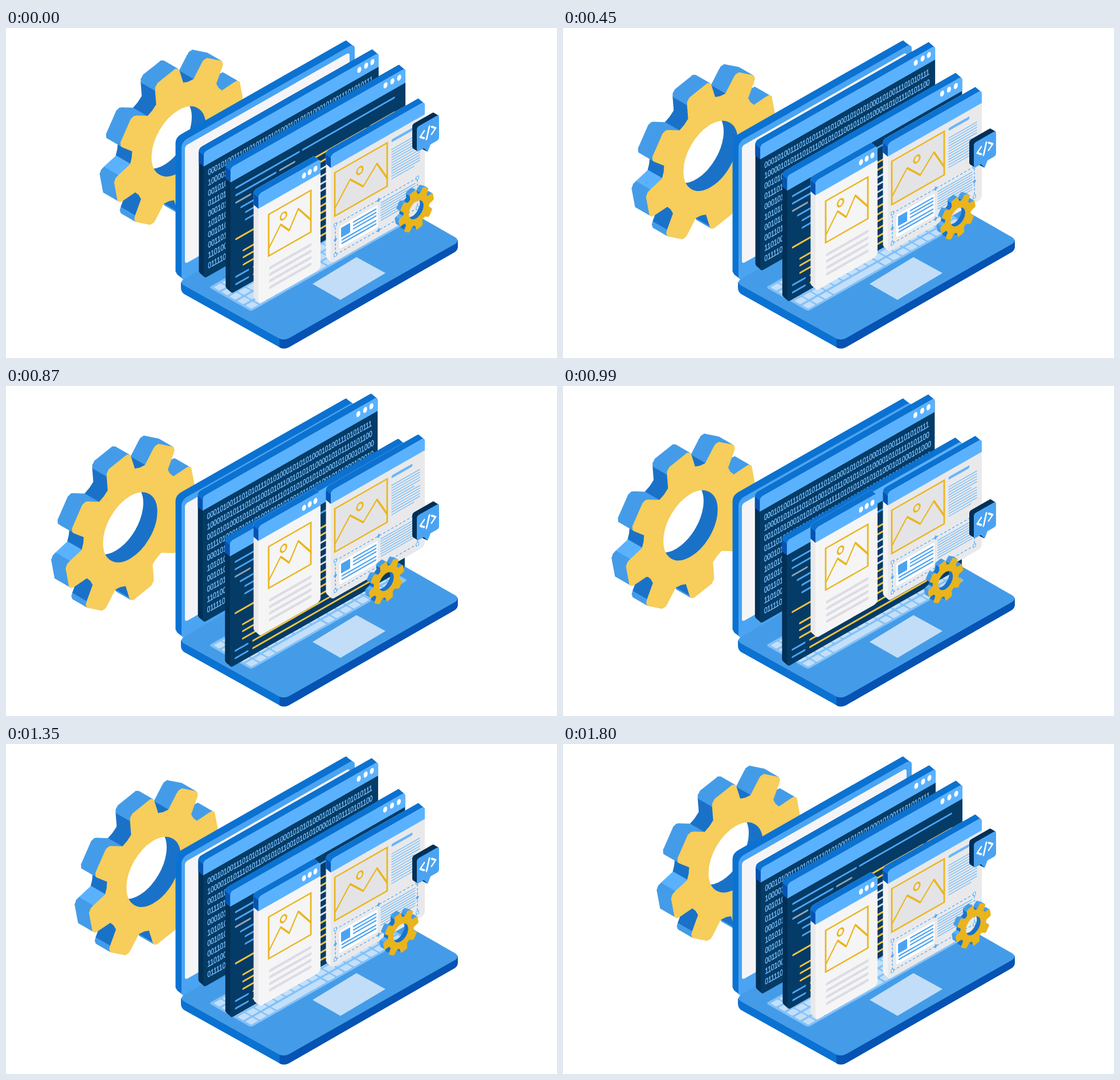
Animation of 967x579 px, one loop 1830 ms. Source, as an HTML page:

```html
<!DOCTYPE html>
<html lang="en">
<head>
<meta charset="utf-8">
<title>Web development</title>
<style>
html, body { margin: 0; width: 100%; height: 100%; overflow: hidden; background: #fff; }
svg { display: block; width: 100vw; height: 100vh; }
text { font: 14.5px "Liberation Sans", Arial, sans-serif; fill: #7cc0fb; stroke: #7cc0fb; stroke-width: .5; }
</style>
</head>
<body>
<svg id="stage" viewBox="0 0 967 579"></svg>
<script>
const SLOPE = 0.57;
const C = {
  sky: '#5ab2ff', mid: '#449ce8', edge: '#0b72d2', deep: '#0653b3', wall: '#1a72c8',
  navy: '#043b67', navySide: '#022f55', gold: '#eab61f', goldLine: '#f3c440',
  grey: '#8ea3b8'
};

// SVG string helpers
const path = (d, fill, more = '') => `<path d="${d}" fill="${fill}" ${more}/>`;
const rect = (x, y, w, h, fill, r = 0, more = '') =>
  `<rect x="${x}" y="${y}" width="${w}" height="${h}" rx="${r}" fill="${fill}" ${more}/>`;
const stroke = (d, color, width, more = '') =>
  path(d, 'none', `stroke="${color}" stroke-width="${width}" stroke-linecap="round" stroke-linejoin="round" ${more}`);
const bar = (x1, x2, y, color, width) => stroke(`M${x1},${y}H${x2}`, color, width);
const repeat = (n, f) => Array.from({ length: n }, (_, i) => f(i)).join('');
const upright = (x, y, inner) => `<g transform="matrix(1,${-SLOPE},0,1,${x},${y})">${inner}</g>`;

// Outline of a rounded panel swept back by (dx, dy)
function hull(w, h, r, dx, dy, square) {
  const k = r * 0.29, b = square ? 0 : k;
  return `M${b},${h - b}l${dx},${dy}L${dx},${h - (square ? 0 : r) + dy}V${dy + r}` +
    `Q${dx},${dy} ${dx + r},${dy}H${w + dx - r}Q${w + dx - k},${dy} ${w + dx - k},${dy + k}` +
    `L${w - k},${k}L${w - r},${h - r}Z`;
}

function panel({ x, y, w, h, head, body, side, dots = [], inner }) {
  const r = 6, dx = -8.5, dy = -12;
  return upright(x, y,
    path(hull(w, h, r, dx, dy), side) +
    path(hull(w, head, r, dx, dy, true), C.edge) +
    path(`M0,${r}L${dx},${dy + r}V${head + dy}L0,${head}Z`, C.deep) +
    rect(0, 0, w, h, body, r) +
    path(`M0,${head}V${r}Q0,0 ${r},0H${w - r}Q${w},0 ${w},${r}V${head}Z`, C.sky) +
    dots.map(([u, v]) => `<ellipse cx="${u}" cy="${v}" rx="3.5" ry="5" fill="#fff"/>`).join('') +
    inner);
}

function picture(x, y, w, h, fill, sun, hills) {
  const pen = `stroke="${C.gold}" stroke-width="2.8"`;
  return rect(x, y, w, h, fill, 0, pen) +
    `<ellipse cx="${sun[0]}" cy="${sun[1]}" rx="5.2" ry="6" fill="none" ${pen}/>` +
    stroke('M' + hills.join('L'), C.gold, 2.8);
}

function sideColor(kind, nx, ny) {
  if (kind === 'tip') return C.mid;
  if (kind === 'root' || ny > -0.55) return C.wall;
  return nx < -0.15 && ny < -0.7 ? C.sky : C.mid;
}

// Extruded gear; the front face is centred on (0, 0)
function gear(face, scale) {
  const d = [-29.5, -29.5], R = 56, pts = [];
  const tooth = [[-16, 98, 'flank'], [-11.5, 122, 'tip'], [-10.5, 127, 'tip'], [-8, 130, 'tip'], [8, 130, 'tip'],
    [10.5, 127, 'tip'], [11.5, 122, 'flank'], [16, 98, 'root'], [22.5, 96, 'root']];
  for (let i = 0; i < 8; i++) {
    for (const [a, r, kind] of tooth) {
      const t = (-56 + 45 * i + a) * Math.PI / 180;
      pts.push({ x: r * Math.cos(t), y: r * Math.sin(t), kind });
    }
  }
  const sides = pts.map((p, i) => {
    const q = pts[(i + 1) % pts.length];
    const len = Math.hypot(q.x - p.x, q.y - p.y);
    const nx = (q.y - p.y) / len, ny = (p.x - q.x) / len;
    return {
      p, q, color: sideColor(p.kind, nx, ny),
      facing: nx * d[0] + ny * d[1], depth: (p.x + q.x) * d[0] + (p.y + q.y) * d[1]
    };
  }).filter(s => s.facing > 0).sort((a, b) => a.depth - b.depth);
  const walls = sides.map(({ p, q, color }) =>
    path(`M${p.x},${p.y}L${q.x},${q.y}l${d}L${p.x + d[0]},${p.y + d[1]}Z`, color,
      `stroke="${color}" stroke-width="1.5" stroke-linejoin="round"`)).join('');

  const dist = Math.hypot(...d), half = Math.sqrt(R * R - dist * dist / 4);
  const n = [-d[1] / dist * half, d[0] / dist * half];
  const a = [d[0] / 2 + n[0], d[1] / 2 + n[1]], b = [d[0] / 2 - n[0], d[1] / 2 - n[1]];
  const hole = path(`M${a}A${R},${R} 0 1 1 ${b}A${R},${R} 0 0 0 ${a}Z`, C.wall);
  const outline = 'M' + pts.map(p => `${p.x},${p.y}`).join('L') + 'Z';
  const ring = `M${R},0A${R},${R} 0 1 0 ${-R},0A${R},${R} 0 1 0 ${R},0Z`;
  return `<g transform="matrix(${0.866 * scale},${-0.5 * scale},0,${scale},0,0)">` + walls + hole +
    path(outline + ring, face, `fill-rule="evenodd" stroke="${face}" stroke-width="2" stroke-linejoin="round"`) + '</g>';
}

function laptop() {
  const top = 'M313,440Q303,446 313,452L478,544Q487,549 497,544L788,379Q797,373 788,367L623,273Q614,268 605,273Z';
  const base =
    path('M307,446V456Q307,463 313,467L478,559Q487,565 487,560V540Z', C.edge) +
    path('M480,540V560Q487,565 497,560L788,393Q793,389 793,384V372Z', C.deep) +
    path(top, C.mid);
  const key = (u, v, w) => rect(u, v, w, 10.5, '#c3dff9', 1.5);
  const keys = repeat(4, row => repeat(18, i => key(4 + i * 15, 4 + row * 14, 12.5))) +
    repeat(3, i => key(4 + i * 15, 60, 12.5)) + key(49, 60, 87) +
    repeat(9, i => key(139 + i * 15, 60, 12.5));
  return base +
    `<g transform="matrix(1,-.567,1,.567,356,455)">${rect(0, 0, 275, 74, '#84c1f7', 4)}${keys}</g>` +
    path('M538,449L615,402L666,430L587,477Z', '#c2ddf8');
}

function lid() {
  const w = 304, h = 245;
  return upright(308, 200,
    path(hull(w, h, 10, -10.5, -14), C.edge) +
    rect(0, 0, w, h, '#4aa4f2', 9) + rect(6, 10.6, 289, 207, '#f5f5f7', 5));
}

function binaryWindow() {
  const rows = [
    '0001010011101010111010100010101010001010011101010111',
    '1000010101110101100101011001010101000010101110101100',
    '0010101000101010001011110101010010101000101000101000',
    '0111010001010110100101010100101101010010101000100010',
    '0001011010100101010101001010010110101001011010101001',
    '1010101001010110101001010101101010010100101011010100',
    '0010100101101010010101101010010101010010110101010010',
    '0011010100101011010100101010110100101010010101101011',
    '1101001010110101001010101101001010110100101010110100',
    '0111101001010101101001010110101001010100101101010010'
  ];
  return panel({
    x: 347, y: 218, w: 307, h: 222, head: 25, body: C.navy, side: C.navySide,
    dots: [[273, 11], [285, 10.5], [296, 10.5]],
    inner: rows.map((s, i) => `<text transform="translate(7.5,${45 + i * 18.2}) scale(.705,1)">${s}</text>`).join('')
  });
}

function codeWindow() {
  const b = '#4ba5f5', y = C.goldLine, g = C.grey, p = '#d9dde3';
  const lines = [
    [41, 9, 121, b], [41, 126, 288, b],
    [54, 9, 80, b], [54, 86, 113, g],
    [67, 9, 36, g], [67, 43, 238, y], [67, 245, 288, y],
    [80, 18, 41, b], [80, 47, 230, y],
    [93, 26, 60, b], [93, 66, 220, p],
    [106, 26, 60, b], [106, 66, 240, p],
    [119, 66, 210, p], [131, 9, 70, y], [131, 76, 225, p],
    [145, 76, 225, y], [158, 22, 240, y], [170, 22, 215, y], [183, 22, 230, y],
    [197, 9, 32, b], [197, 40, 200, y], [210, 9, 32, b], [210, 40, 246, y]
  ];
  return panel({
    x: 394, y: 245, w: 307, h: 222, head: 26, body: C.navy, side: C.navySide,
    dots: [[272, 10.5], [284, 10.5], [296, 11]],
    inner: lines.map(([v, u1, u2, c]) => bar(u1 + 1, u2 - 1, v, c, 3.4)).join('')
  });
}

function articleWindow() {
  return panel({
    x: 443, y: 292, w: 109, h: 193, head: 25, body: '#f5f5f6', side: '#e9e9ec',
    dots: [[80, 12.5], [90, 12], [100, 12]],
    inner: picture(18, 45.3, 74, 73, 'none', [44, 63], [[19, 104], [39, 75], [54, 94], [70, 65], [92, 97]]) +
      repeat(4, i => bar(21, 91, 140.5 + i * 11.4, '#dcdce5', 5))
  });
}

function layoutWindow() {
  const line = '#7cbdf7', handle = '#58adf7';
  const box = (u, v) => rect(u - 2, v - 2.5, 4, 5, '#fff', 0, `stroke="${handle}" stroke-width="1.2"`);
  const diamond = (u, v) => path(`M${u - 3},${v}l3,-4l3,4l-3,4Z`, handle);
  return panel({
    x: 570, y: 223, w: 165, h: 191, head: 22.5, body: '#e9e9eb', side: '#f3f3f4',
    inner: '<g transform="translate(0,1)">' +
      picture(7, 34, 92, 76, '#e4e4e6', [51, 55], [[8, 95], [34, 61], [57, 86.5], [81, 60], [99, 96]]) +
      bar(109, 141, 35, '#69b5fa', 5) +
      repeat(12, i => bar(107, i % 6 === 5 ? 146 : 156, 50 + i * 4.7, line, 1.6)) +
      repeat(8, i => bar(88, 148, 133 + i * 4.4, line, 1.6)) +
      rect(15, 133, 67, 39, '#fff', 2) + rect(18, 137, 16, 17, '#4ba3f0', 1) +
      [139, 145, 151].map(v => bar(40, 79, v, '#4ba3f0', 2.6)).join('') +
      [159, 165].map(v => bar(20, 79, v, '#4ba3f0', 2.6)).join('') +
      rect(8, 125.6, 144, 53, 'none', 0, `stroke="${handle}" stroke-width="1.5" stroke-dasharray="4 3"`) +
      [[8, 125.6], [152, 125.6], [8, 178.6], [152, 178.6]].map(p => box(...p)).join('') +
      [[84, 125.6], [84, 178.6], [8, 152], [152, 152]].map(p => diamond(...p)).join('') + '</g>'
  });
}

function bubble() {
  const w = 39, h = 44;
  return upright(721, 174,
    path(hull(w, h, 4, -8, -9.5), C.navySide) +
    path('M6,40L18,53L19,42Z', C.navySide) +
    path('M11,42L19,54L25,42Z', '#4aa3f2') +
    rect(0, 0, w, h, '#4aa3f2', 4) +
    stroke('M13,14L6,20.5L13,27M22,11L17,31M26,14L33,20.5L26,27', '#fff', 3));
}

// Each part: drawing, home position, and travel at the far end of the swing
const parts = [
  { draw: gear('#f7cd5b', 1), x: 303, y: 199, dx: -88, dy: 50.6 },
  { draw: lid() + laptop() },
  { draw: binaryWindow(), dx: -1.8, dy: -25 },
  { draw: codeWindow(), dx: -1.2, dy: 29 },
  { draw: layoutWindow(), dx: 0, dy: -40 },
  { draw: articleWindow(), dx: 0, dy: -46.8 },
  { draw: gear('#e9b41c', 0.272), x: 720, y: 319, dx: -54, dy: 25 },
  { draw: bubble(), dx: 0, dy: 56 }
];

const stage = document.getElementById('stage');
stage.innerHTML = parts.map(p => `<g>${p.draw}</g>`).join('');
const nodes = [...stage.children];

const STEP = 30, COUNT = 61, TURN = 30;
const start = performance.now();

function render(now) {
  const step = Math.floor(Math.max(0, now - start) / STEP) % COUNT;
  const swing = 1 - Math.abs(step - TURN) / TURN;
  parts.forEach(({ x = 0, y = 0, dx = 0, dy = 0 }, i) =>
    nodes[i].setAttribute('transform', `translate(${x + dx * swing},${y + dy * swing})`));
  requestAnimationFrame(render);
}
render(start);
</script>
</body>
</html>
```
